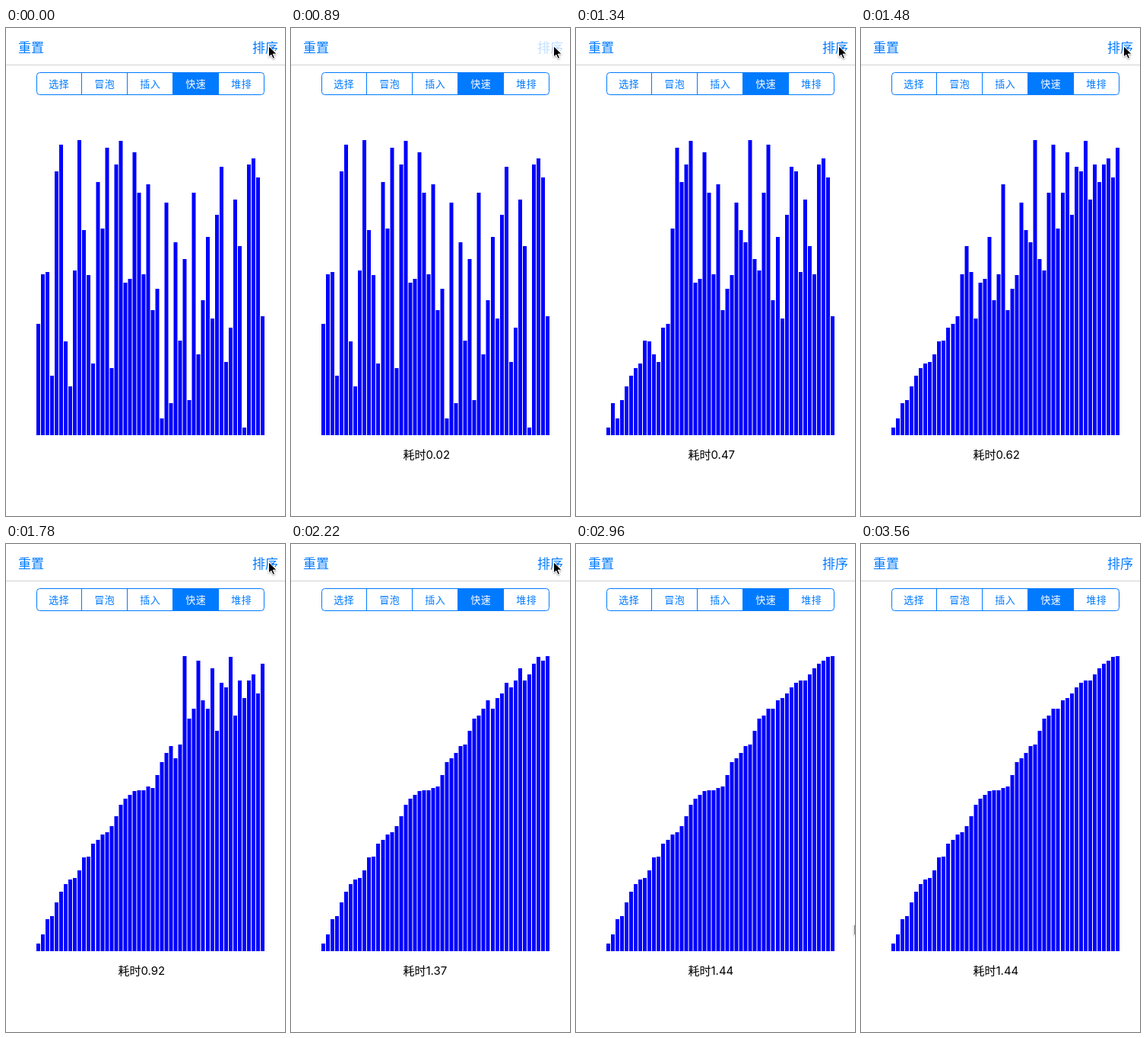
Write an HTML page that moves like this. It is 367 px wide and 640 px high and loops after 3.86 s.

```html
<!DOCTYPE html>
<html lang="zh-CN">
<head>
<meta charset="utf-8">
<title>快速排序</title>
<style>
  html, body { margin: 0; width: 100%; height: 100%; overflow: hidden; background: #fff; }
  svg { display: block; width: 367px; height: 640px; }
  text { font-family: Inter, "Noto Sans CJK SC", "Noto Sans CJK", sans-serif; }
  .nav { font-size: 17px; fill: #007aff; }
  .tab { font-size: 13px; fill: #007aff; text-anchor: middle; letter-spacing: .4px; }
  .tab.on { fill: #fff; }
  #cursor { filter: drop-shadow(0 1px 1px rgba(0, 0, 0, .35)); }
</style>
</head>
<body>
<svg viewBox="0 0 367 640">
  <rect y="48" width="367" height="1" fill="#d2d2d2"/>
  <text class="nav" x="16" y="32.3">重置</text>
  <text class="nav" id="sort" x="324" y="32.3">排序</text>
  <g id="tabs">
    <rect x="40.5" y="58.5" width="299" height="29" rx="4" fill="none" stroke="#007aff"/>
    <rect x="219" y="58" width="61" height="30" fill="#007aff"/>
  </g>
  <g id="bars" fill="#00f"></g>
  <text id="label" x="147.5" y="565" font-size="15" fill="#000"></text>
  <g id="cursor">
    <path d="M1 .8V15L4.3 12 6.7 17.2 9 16.2 6.7 11.1H11.6Z" fill="#000" stroke="#fff"/>
  </g>
</svg>
<script>
const LOOP = 3860, BASE = 534, COMPARES_PER_SEC = 200;
const tops = [
  388, 323, 320, 456, 188, 153, 411, 470, 318, 147, 265, 324, 440, 202, 263, 157, 446,
  179, 148, 334, 329, 163, 216, 323, 205, 370, 342, 512, 229, 492, 281, 410, 303, 488,
  216, 428, 357, 274, 381, 245, 182, 438, 393, 225, 286, 524, 179, 171, 196, 378];

// Start times of the held pictures
const ticks = [890, 1040, 1190, 1340, 1480, 1630, 1780, 1930, 2070, 2220, 2370];
const fades = [[0, 1], [890, .24], [1040, .5], [1190, .8], [1340, 1]];
const pointer = [
  [0, 344.5, 23], [2660, 343.5, 27], [2810, 351, 274], [2960, 365, 498],
  [3110, 365, 510], [3260, 353, 605], [3410, 349, 631], [3560, 400, 660]];

const $ = id => document.getElementById(id);
function add(parent, tag, attrs) {
  const el = document.createElementNS("http://www.w3.org/2000/svg", tag);
  for (const key in attrs) el.setAttribute(key, attrs[key]);
  return parent.appendChild(el);
}

["选择", "冒泡", "插入", "快速", "堆排"].forEach((name, i) => {
  if (i) add($("tabs"), "rect", { x: 39 + 60 * i, y: 58, width: 1, height: 30, fill: "#007aff" });
  const cls = i === 3 ? "tab on" : "tab";
  add($("tabs"), "text", { class: cls, x: 69.7 + 60 * i, y: 77.8 }).textContent = name;
});

// Bars sit on half pixels, spread evenly up to the right edge
const bars = tops.map((_, i) =>
  add($("bars"), "rect", { x: 40 + 6 * i + Math.round(2 * i / 49) / 2, width: 5 }));

// history[n] is the array after n comparisons
function recordSort(a) {
  const history = [];
  const less = (x, y) => { history.push(a.slice()); return x < y; };
  const swap = (i, j) => { [a[i], a[j]] = [a[j], a[i]]; };
  function sort(lo, hi) {
    if (lo >= hi) return;
    const pivot = a[lo];
    let i = lo, j = hi;
    while (i < j) {
      while (i < j && !less(a[j], pivot)) j--;
      if (i < j) swap(i++, j);
      while (i < j && !less(pivot, a[i])) i++;
      if (i < j) swap(i, j--);
    }
    sort(lo, i - 1);
    sort(i + 1, hi);
  }
  sort(0, a.length - 1);
  history.push(a.slice());
  return history;
}
const history = recordSort(tops.map(top => BASE - top));
const last = history.length - 1;

const at = (list, t) => list.findLast(entry => entry[0] <= t);
let shown = -1;

function showSort(tick) {
  if (tick === shown) return;
  shown = tick;
  const secs = Math.min(.02 + .15 * tick, 1.44);
  const count = tick < 0 ? 0 : Math.min(last, Math.round(secs * COMPARES_PER_SEC - 2));
  history[tick === ticks.length - 1 ? last : count].forEach((h, i) => {
    bars[i].setAttribute("y", BASE - h);
    bars[i].setAttribute("height", h);
  });
  $("label").textContent = tick < 0 ? "" : "耗时" + secs.toFixed(2);
}

function draw(t) {
  showSort(ticks.findLastIndex(start => start <= t));
  $("sort").setAttribute("opacity", at(fades, t)[1]);
  const [, x, y] = at(pointer, t);
  $("cursor").setAttribute("transform", `translate(${x} ${y})`);
}

shown = null;
const begin = performance.now();
function frame() {
  draw((performance.now() - begin) % LOOP);
  requestAnimationFrame(frame);
}
frame();
</script>
</body>
</html>
```
